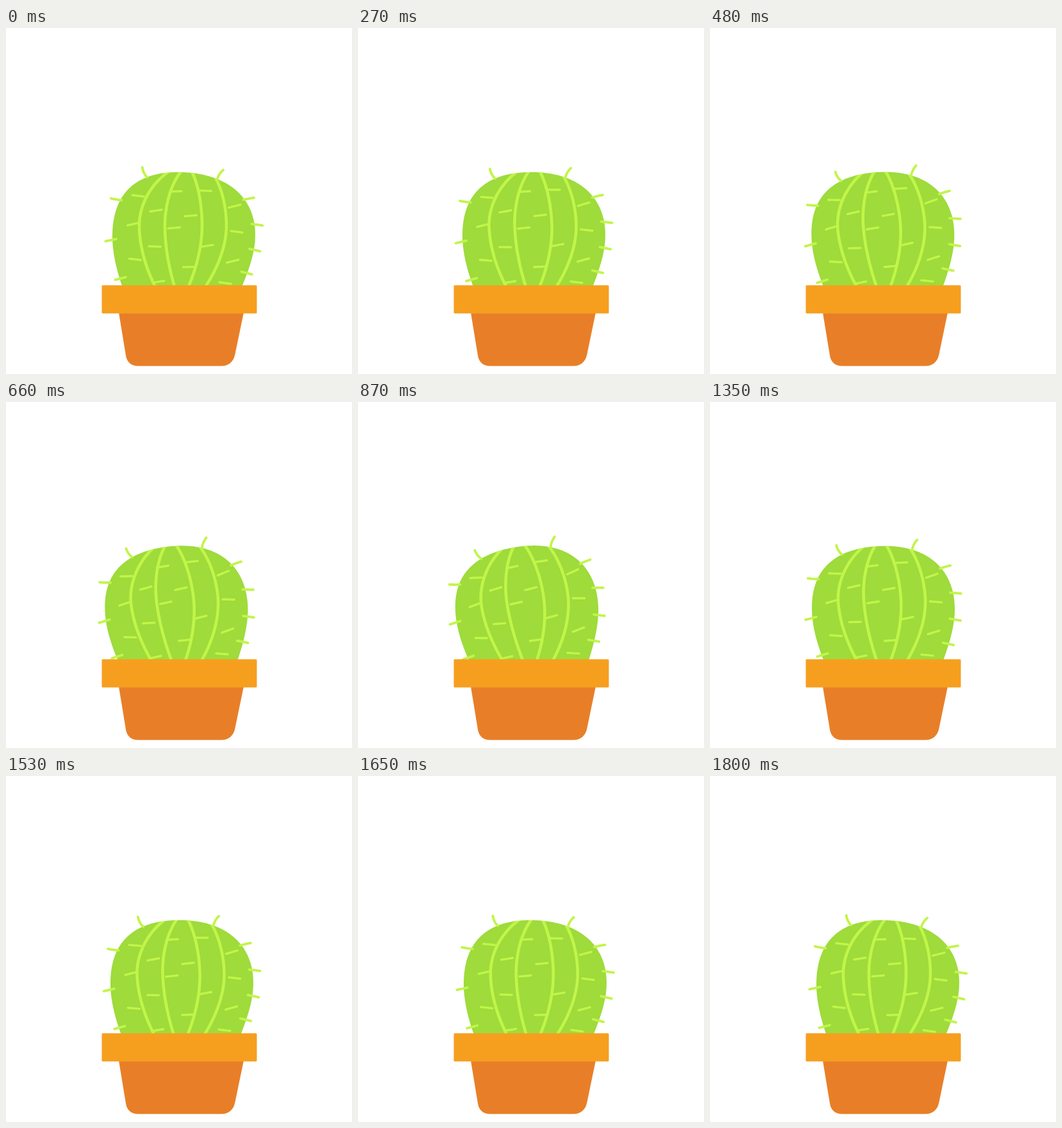
These frames come from a looping animation (540 by 540 pixels, 1.83 s). An HTML page:

```html
<!DOCTYPE html>
<html lang="en">
<head>
<meta charset="utf-8">
<title>Swaying cactus</title>
<style>
  html, body { margin: 0; width: 100%; height: 100%; overflow: hidden; background: #fff; }
  svg { display: block; width: 100%; height: 100%; }
  .line { fill: none; stroke: #c1f549; stroke-linecap: round; stroke-linejoin: round; }
</style>
</head>
<body>
<svg viewBox="0 0 540 540">
  <clipPath id="inside"><path id="clip"/></clipPath>
  <path id="plant" fill="#9edb3b"/>
  <path id="ribs" class="line" stroke-width="4.6" clip-path="url(#inside)"/>
  <path id="thorns" class="line" stroke-width="3.4"/>
  <path id="spikes" class="line" stroke-width="3.8"/>
  <path fill="#e87f28" d="M176 444H371L357.3 510C355 521 347 527.5 337 527.5H206C195 527.5 188.5 521 187 511Z"/>
  <rect x="149.5" y="401.5" width="242" height="44" rx="1.5" fill="#f69f1f"/>
</svg>
<script>
const FRAME = 30, FRAMES = 61, HALF = 30;
const AXIS = 268, SOIL = 402, TOP = 224, WAIST = 318, REACH = 0.94;

const node = id => document.getElementById(id);
const mix = (a, b, t) => a + (b - a) * t;

// Points along a path, so that it can be bent smoothly
function trace(d, step = 3) {
  const path = document.createElementNS("http://www.w3.org/2000/svg", "path");
  path.setAttribute("d", d);
  const length = path.getTotalLength(), count = Math.ceil(length / step);
  return Array.from({ length: count + 1 }, (_, i) => {
    const { x, y } = path.getPointAtLength(length * i / count);
    return [x, y];
  });
}

function stroke(x, y, dx, dy, bend = 0) {
  const length = Math.hypot(dx, dy);
  const cx = x + dx / 2 + bend * dy / length, cy = y + dy / 2 - bend * dx / length;
  return trace(`M${x} ${y}Q${cx} ${cy} ${x + dx} ${y + dy}`);
}

const outline = trace("M190 425C177 395 166 358 166 325C166 265 196 225 268 225"
  + "C340 225 389 260 389 323C389 350 380 378 358 427", 2);

function edgeAt(height, side) {
  const half = outline.filter(([x]) => (x - AXIS) * side > 0);
  return half.reduce((a, b) => Math.abs(b[1] - height) < Math.abs(a[1] - height) ? b : a);
}

function rib([top, mid, bottom]) {
  return trace(`M${top} ${TOP}C${mix(top, mid, 0.65)} 245 ${mid} 278 ${mid} 308`
    + `C${mid} 342 ${mix(mid, bottom, 0.4)} 378 ${bottom} 410`);
}

// Spikes cross the outline: upright near the top, drooping and rooted deeper lower down
function spike(height, side) {
  const [x, y] = edgeAt(height, side);
  const drop = height - 234;
  const angle = (77 * Math.exp(-drop / 30) - 15) * Math.PI / 180;
  const dx = side * Math.cos(angle), dy = -Math.sin(angle);
  const inset = Math.max(0, drop / 16);
  return stroke(x - dx * inset, y - dy * inset, dx * 17, dy * 17, 3 * Math.max(0, -dy));
}

// Thorns stand in columns that follow the round body; tilts alternate, more so at the sides
function thorn(mid, height, parity) {
  const offset = mid - 274, rise = WAIST - height;
  const x = 274 + offset * (1 - 0.24 * (rise / 90) ** 2) + 0.02 * rise;
  const dy = -1 + (parity ? -1 : 1) * 3.5 * Math.abs(offset) / 86;
  return stroke(x - 9, height - dy / 2, 18, dy);
}

const spikeHeights = { "-1": [233, 268, 331, 391], "1": [236, 267, 306, 346, 383] };
const thornColumns = [
  [198, 262, 306, 361], [232, 285, 341, 396], [262, 255, 312],
  [288, 293, 373], [315, 254, 340], [360, 278, 318, 364, 398]
];

const shapes = {
  plant: [outline],
  ribs: [[254, 208, 236], [273, 248, 265], [290, 306, 282], [321, 344, 307]].map(rib),
  spikes: Object.entries(spikeHeights).flatMap(([side, rows]) => rows.map(h => spike(h, +side))),
  thorns: thornColumns.flatMap(([mid, ...rows], c) => rows.map((h, r) => thorn(mid, h, (c + r) % 2)))
};

// Leaning motion: the slice at each height shifts left and turns, more so higher up
function drift(x, y) {
  const h = SOIL - y;
  return [-(6 + 0.085 * h + 0.00035 * h * h), -(0.085 + 0.0007 * h) * (x - AXIS)];
}

function lean([x, y], amount) {
  const [ax, ay] = drift(x, y);
  const [bx, by] = drift(x + ax * amount / 2, y + ay * amount / 2);
  return [x + bx * amount, y + by * amount];
}

function draw(ms) {
  const frame = Math.floor(ms / FRAME) % FRAMES;
  const p = 1 - Math.abs(frame - HALF) / HALF;
  const amount = REACH * p * p * (3 - 2 * p);
  for (const id in shapes) {
    const d = shapes[id].map(points => "M" + points
      .map(q => lean(q, amount).map(v => v.toFixed(2)).join(" ")).join("L")).join("");
    node(id).setAttribute("d", d);
    if (id === "plant") node("clip").setAttribute("d", d);
  }
}

let start;
function tick(now) {
  start ??= now;
  draw(Math.max(0, now - start));
  requestAnimationFrame(tick);
}
draw(0);
requestAnimationFrame(tick);
</script>
</body>
</html>
```
